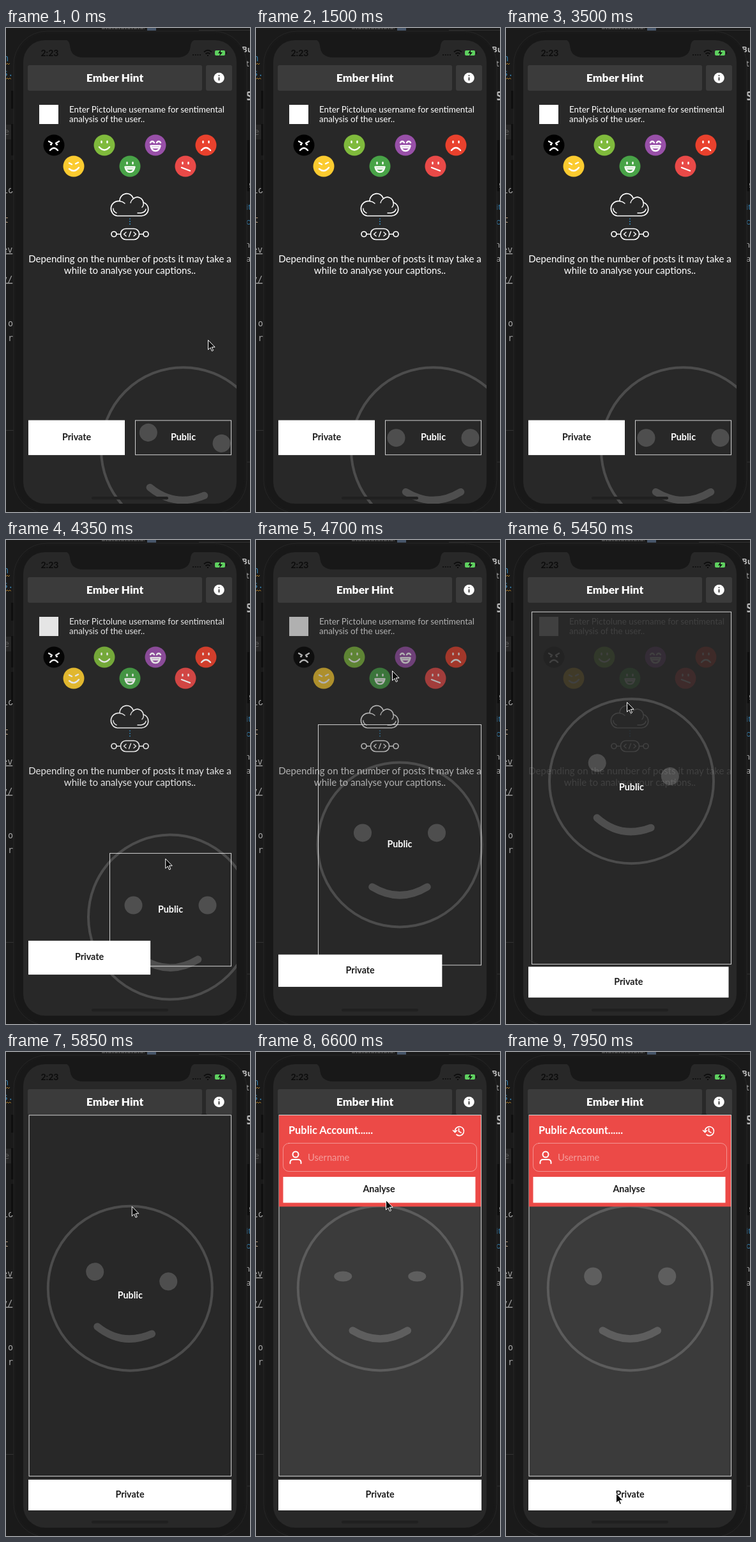
An HTML page for the animation above (8 s loop, 382x756 px).

```html
<!DOCTYPE html>
<html lang="en">
<head>
<meta charset="utf-8">
<title>Caption mood app</title>
<style>
html, body { margin: 0; width: 100%; height: 100%; overflow: hidden; background: #1a1a1a; }
svg { display: block; width: 100%; height: 100%; }
text { font-family: Lato, sans-serif; fill: #fff; }
.mid { text-anchor: middle; }
.bold { font-weight: 700; }
.label { font-size: 14.3px; font-weight: 700; text-anchor: middle; }
.dark { fill: #1c1c1c; }
.line { fill: none; stroke: #fff; stroke-linecap: round; stroke-linejoin: round; }
.code text { font: 13.5px "DejaVu Sans Mono", monospace; fill: #a5a5a5; }
.page text { font-family: "Open Sans", sans-serif; font-size: 13px; fill: #b8b8b8; }
.code .blue, .page .blue { fill: #357fae; }
</style>
</head>
<body>
<svg viewBox="0 0 382 756">
  <defs>
    <clipPath id="screen"><rect x="27" y="19" width="334" height="724" rx="34"/></clipPath>
  </defs>

  <!-- desktop behind the phone -->
  <rect width="382" height="756" fill="#1a1a1a"/>
  <path d="M150 1H217" stroke="#777" stroke-dasharray="5 1 3 1"/>
  <path d="M221 2H235" stroke="#47566a" stroke-width="4"/>
  <path d="M0 628.500H12M376 678H382M302 3.500H382" stroke="#333"/>
  <g class="code">
    <text class="blue" x="-4" y="52">n</text>
    <text class="blue" x="-5" y="75">s.</text>
    <path d="M0 57l2 -2 2 2 2 -2M0 80l2 -2 2 2 2 -2 2 2" fill="none" stroke="#a97827"/>
    <rect y="151" width="9" height="23" fill="#262626"/>
    <text x="-3" y="167" style="fill:#555">e</text>
    <text x="-5" y="258">io</text>
    <text x="-4" y="304" style="fill:#b39a7e">t</text>
    <text x="-6" y="351" text-decoration="underline">ev</text>
    <text x="-6" y="397" text-decoration="underline">v/</text>
    <text x="3" y="466">o</text>
    <text x="3" y="489">r</text>
  </g>
  <g class="page">
    <text class="bold" x="369" y="38">Bu</text>
    <text x="376" y="60">t</text>
    <text class="bold" x="375" y="113" style="font-size:20px">S</text>
    <text x="376" y="249">e</text>
    <text class="blue" x="376" y="284">it</text>
    <text class="blue" x="376" y="307">o</text>
    <text x="374" y="343">ng</text>
    <text x="376" y="365">a</text>
  </g>

  <!-- phone body -->
  <path d="M10 98V126M10 150V199M10 206V255M379 175V255" stroke="#0f0f0f" stroke-width="4"/>
  <rect x="12" y="5" width="365" height="753" rx="52" fill="#191919" stroke="#262626"/>
  <rect x="16" y="9" width="357" height="745" rx="48" fill="#181818"/>

  <g clip-path="url(#screen)">
    <rect x="27" y="19" width="334" height="724" fill="#282828"/>
    <text class="bold" x="54.500" y="44" style="font-size:14px;fill:#0c0c0c">2:23</text>
    <path d="M292 42H305" stroke="#111" stroke-width="2" stroke-dasharray="2 1.700"/>
    <g fill="none" stroke="#0d0d0d" stroke-width="2">
      <path d="M310 37.500Q316 32 322 37.500M312.500 40.500Q316 37.500 319.500 40.500M315 43H317"/>
    </g>
    <rect x="327" y="35" width="16" height="8" rx="2" fill="#5fd160"/>
    <path d="M345 37V41" stroke="#111" stroke-width="1.500"/>
    <path d="M336 34l-4 5.500h3l-1 4.500 5 -6h-3z" fill="#111"/>

    <rect x="34" y="58" width="273" height="40" rx="3" fill="#3b3b3b"/>
    <rect x="313" y="58" width="41" height="40" rx="3" fill="#3b3b3b"/>
    <text class="mid" x="170.500" y="84" style="font-size:17.500px;font-weight:900">Ember Hint</text>
    <circle cx="333.500" cy="78" r="8.300" fill="#fff"/>
    <path d="M333.500 77V82M333.500 73.500V75.300" stroke="#333" stroke-width="1.800"/>

    <g id="intro">
      <rect x="52" y="120" width="30" height="30" fill="#fff"/>
      <g style="font-size:13.400px">
        <text x="99" y="132">Enter Pictolune username for sentimental</text>
        <text x="99" y="147">analysis of the user..</text>
      </g>
      <g id="moods"></g>
      <g class="line" stroke-width="1.700">
        <path d="M174 293.500H212.500A10.700 10.700 0 0 0 215 272.500A9.500 9.500 0 0 0 199.500 266.500A11 11 0 0 0 178 270.500A11.500 11.500 0 0 0 174 293.500Z"/>
        <path d="M178 270.500Q183 271 186 274M199.500 266.500Q196 269 195 273M215 272.500Q216 277 213 280M168 282Q168 287 173 289M206 289H211Q218 288 219 283" stroke-width="1.400"/>
        <path d="M194 298V310" stroke="#2f9bd8" stroke-dasharray=".1 4"/>
        <rect x="179.500" y="313.500" width="29" height="17" rx="8"/>
        <circle cx="169" cy="322" r="4"/><circle cx="219" cy="322" r="4"/>
        <path d="M173 322H179M209 322H215M188 319l-3.500 3 3.500 3M200 319l3.500 3 -3.500 3M195.500 318l-3 8" stroke-width="1.400"/>
      </g>
      <g class="mid" style="font-size:15.100px">
        <text x="194" y="366">Depending on the number of posts it may take a</text>
        <text x="194" y="384">while to analyse your captions..</text>
      </g>
    </g>

    <rect id="panel" fill="#3b3b3b" stroke="#d2d2d2"/>
    <g id="face">
      <circle r="128.500" fill="none" stroke="#fff" stroke-opacity=".17" stroke-width="4"/>
      <g id="features" fill="#fff" opacity=".18">
        <ellipse class="eye" cx="-58" cy="-18.500" rx="14"/>
        <ellipse class="eye" cx="58" cy="-18.500" rx="14"/>
        <path class="line" d="M-43 66Q0 92 43 66" stroke-width="11.500"/>
      </g>
    </g>
    <text id="publicLabel" class="label">Public</text>

    <g id="form">
      <rect x="36" y="99" width="316" height="142.500" fill="#ec4a47"/>
      <text class="bold" x="51" y="128" style="font-size:16.400px">Public Account......</text>
      <g class="line" stroke-width="1.700">
        <path d="M311.500 124A7 7 0 1 1 314 129M317.500 119.500V124L321 126M308.500 122.500l3 3 3 -3"/>
        <rect x="42.500" y="142.500" width="303" height="44" rx="9" stroke-width="1" stroke-opacity=".4"/>
        <circle cx="62" cy="160" r="4.500" stroke-width="2"/>
        <path d="M53.500 174V172Q54 168 58 168H66Q70 168 70.500 172V174" stroke-width="2"/>
      </g>
      <text x="81" y="170" style="font-size:14.700px" fill-opacity=".45">Username</text>
      <rect x="42.500" y="195" width="301" height="40.500" fill="#fff"/>
      <text class="label dark" x="192.500" y="219">Analyse</text>
    </g>

    <rect id="private" x="35" fill="#fff"/>
    <text id="privateLabel" class="label dark">Private</text>
    <rect x="134" y="732" width="120" height="4.500" rx="2.200" fill="#202020"/>
  </g>
  <path d="M92 18H298Q290 19 289 27Q288 46 268 46H121Q101 46 100 27Q99 19 92 18Z" fill="#181818"/>

  <path id="cursor" d="M.5 .5V15.500L4 12.200 6.300 17.600 8.500 16.600 6.200 11.400H11Z" fill="#080808" stroke="#fff"/>
</svg>
<script>
const LOOP = 8000;
const $ = id => document.getElementById(id);
const eyes = document.querySelectorAll('.eye');

function set(node, attrs) {
  for (const key in attrs) node.setAttribute(key, attrs[key]);
}

// x, y, colour, strokes of the small mood faces
const dots = 'M-4.500 -6V-4M4.500 -6V-4';
const grin = 'M-7.500 1H7.500Q6 9 0 9Q-6 9 -7.500 1ZM-5 4H5';
const moods = [
  [75, 183, '#000', 'M-8 -6L-3 -3M8 -6L3 -3M-5 -1H-4M5 -1H4M-6 8Q0 1 6 8'],
  [154, 183, '#7fba3c', dots + 'M-8 3Q0 12 8 3'],
  [234, 183, '#9850a8', 'M-8 -4Q-5 -8 -2 -4M2 -4Q5 -8 8 -4' + grin],
  [313, 183, '#e9412d', dots + 'M-7 8Q0 0 7 8'],
  [106, 216, '#fbcb30', 'M-7 -5L-3 -3M3 -4L7 -6M-7 4Q1 11 8 2'],
  [194, 216, '#48a347', dots + grin],
  [281, 216, '#e94a48', dots + 'M-6 2L7 7']
];
$('moods').innerHTML = moods.map(([x, y, colour, strokes]) =>
  `<g transform="translate(${x} ${y})"><circle r="16.500" fill="${colour}"/>
   <path class="line" d="${strokes}" stroke-width="2.400"/></g>`).join('');

const clamp = v => Math.min(1, Math.max(0, v));
const ramp = (t, from, to) => clamp((t - from) / (to - from));
const smooth = u => u * u * (3 - 2 * u);
const linear = u => u;
const mix = (a, b, u) => a + (b - a) * u;

// Each key is [time, ...values].
function sample(keys, t, ease = smooth) {
  const next = keys.findIndex(key => key[0] > t);
  if (next < 1) return (next ? keys[keys.length - 1] : keys[0]).slice(1);
  const a = keys[next - 1], b = keys[next];
  const u = ease(ramp(t, a[0], b[0]));
  return a.slice(1).map((v, i) => mix(v, b[i + 1], u));
}

const tiltKeys = [[0, 8.4], [420, 0], [5000, 0], [5350, 10.3], [5650, 10.3], [6240, 0]];
const blinkKeys = [[510, 1], [660, .1], [850, 1], [6350, 1], [6500, .1], [6690, 1]];
const cursorKeys = [
  [0, 316, 487], [250, 316, 480], [1000, 386, 380], [3520, 386, 400],
  [3900, 265, 627], [4150, 265, 625], [4700, 213, 204], [5450, 189, 253],
  [6200, 203, 231], [6900, 203, 231], [7400, 190, 460], [7700, 172, 708], [7950, 172, 689]
];

function render(t) {
  const open = 1 - (1 - ramp(t, 4194, 5988)) ** 3;
  const filled = ramp(t, 6000, 6500);

  const left = mix(202.5, 36, open), top = mix(613, 98.5, open);
  const width = 352.5 - left, height = mix(666.7, 662.5, open) - top;
  const cx = left + width / 2, cy = top + height / 2;
  set($('panel'), { x: left, y: top, width, height, 'fill-opacity': filled });
  set($('publicLabel'), { x: cx, y: cy + 4, opacity: 1 - filled });
  set($('face'), { transform: `translate(${cx} ${cy + mix(18.8, -11.5, open)})` });
  set($('features'), { transform: `rotate(${sample(tiltKeys, t)[0]})` });
  const ry = 14 * sample(blinkKeys, t, linear)[0];
  eyes.forEach(eye => set(eye, { ry }));

  const y = mix(612.6, 668, open), w = mix(151, 318, open), h = mix(54.5, 48, open);
  set($('private'), { y, width: w, height: h });
  set($('privateLabel'), { x: 35 + w / 2, y: y + h / 2 + 4 });

  set($('intro'), { opacity: 1 - ramp(t, 4180, 5620) });
  set($('form'), { opacity: filled });

  const [mx, my] = sample(cursorKeys, t);
  set($('cursor'), { transform: `translate(${mx} ${my})` });
}

function tick() {
  render(performance.now() % LOOP);
  requestAnimationFrame(tick);
}
tick();
</script>
</body>
</html>
```
